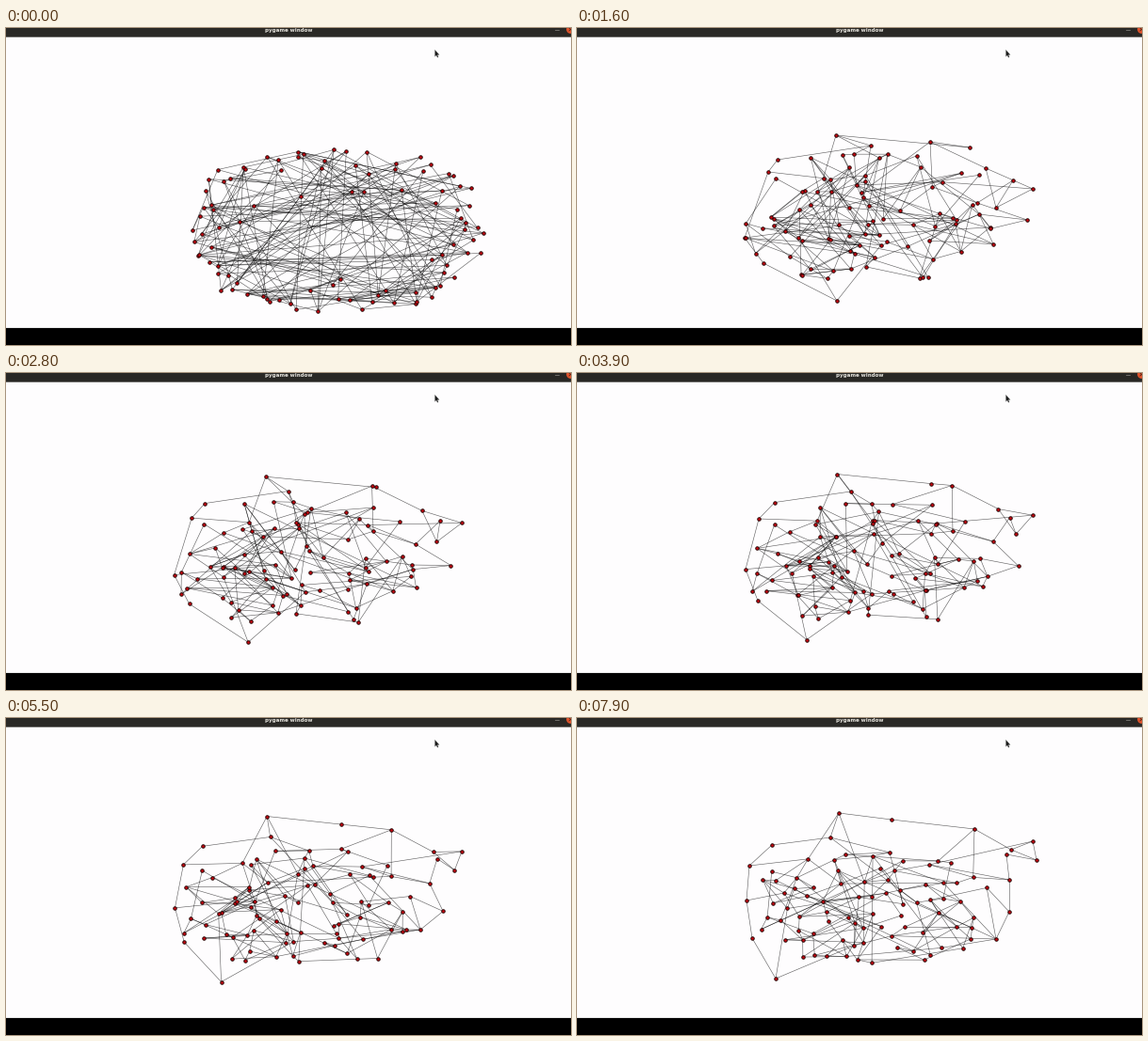
Animation, 600 px wide and 337 px high, one loop 8 s. Source, as a matplotlib script:

```python
import numpy as np
import matplotlib.pyplot as plt
from matplotlib.animation import FuncAnimation
from matplotlib.collections import LineCollection
from matplotlib.patches import Circle, Polygon, Rectangle

W, H, DPI = 600, 337, 100
FRAMES, INTERVAL = 80, 100
PX = 72 / DPI  # points per pixel
INNER = 79
MAX_DEGREE = 6
rng = np.random.default_rng(7)

# Key points of the outline, in order: resting place and drift towards it.
OUTLINE = np.array([
    (278, 101, 3, -13), (334, 108, -83, -19), (422, 118, 47, -3),
    (461, 140, 27, -9), (484, 131, 0, -40), (488, 151, 43, -40),
    (456, 145, -7, -17), (459, 172, 34, -14), (459, 206, -19, 2),
    (445, 235, 18, 37), (211, 277, -65, -13), (186, 234, -12, -16),
    (180, 194, 2, -29), (183, 157, -20, 4), (207, 135, -6, -5),
    (269, 127, -43, 2),
], float)
outer_end, drift = OUTLINE[:, :2], OUTLINE[:, 2:]
N_OUTER = len(OUTLINE)

CENTER = np.array([312.0, 201.0])
RADII = np.array([126.0, 62.0])


def rounded(ang, power):
    """Unit superellipse points at the given angles."""
    c, s = np.cos(ang), np.sin(ang)
    rad = (abs(c) ** power + abs(s) ** power) ** (-1 / power)
    return np.c_[c * rad, s * rad]


def spread_points(count):
    """Fill the central area with fairly even spacing."""
    pts = outer_end.copy()
    for _ in range(count):
        rad = np.sqrt(rng.uniform(0, 1, (5, 1)))
        cand = CENTER + RADII * rad * rounded(rng.uniform(0, 2 * np.pi, 5), 2.6)
        gap = np.linalg.norm(cand[:, None] - pts, axis=2).min(axis=1)
        pts = np.vstack([pts, cand[gap.argmax()]])
    return pts[N_OUTER:]


def ring_points(count):
    """Noisy rounded ring on which the layout starts."""
    ang = (np.arange(count) + rng.uniform(-0.8, 0.8, count)) * 2 * np.pi / count
    u, v = rng.uniform(0, 1, (2, count, 1))
    rad = 1.02 - 0.13 * u - 0.55 * v ** 5
    return rng.permutation((352, 214) + rad * rounded(ang, 2.7) * (152, 87))


def make_links(pos):
    """Chain the outline, then join nodes that end up near each other."""
    links = set()
    degree = np.zeros(len(pos), int)

    def join(i, j):
        pair = (min(i, j), max(i, j))
        if pair not in links:
            links.add(pair)
            degree[[i, j]] += 1

    for i in range(N_OUTER):
        j = (i + 1) % N_OUTER
        if np.linalg.norm(pos[i] - pos[j]) < 95:
            join(i, j)
    for i, p in enumerate(pos):
        weight = np.exp(-np.linalg.norm((pos - p) * (1, 1.3), axis=1) / 30)
        weight[i] = 0
        weight[degree >= MAX_DEGREE] = 0
        count = 1 if i < N_OUTER else 2
        for j in rng.choice(len(pos), count, replace=False, p=weight / weight.sum()):
            join(i, int(j))
    return np.array(sorted(links))


inner_end = spread_points(INNER)
loose = inner_end + rng.normal(0, 1, (INNER, 2)) * (38, 25)
reach = (abs((loose - CENTER) / (RADII * 1.08)) ** 2.6).sum(axis=1) ** (1 / 2.6)
loose = CENTER + (loose - CENTER) / np.maximum(1, reach)[:, None]
offset = loose - inner_end
bend = rng.normal(0, 0.2, (INNER, 2)) * offset[:, ::-1]

start = ring_points(N_OUTER + INNER)
links = make_links(np.vstack([outer_end, inner_end]))

HELD = {1, 2, 5, 8, 18, 19, 24, 29, 30, 40, 41, 56}


def layout(tick):
    """Fast collapse of the ring, then a drift that slows with log time."""
    step = sum(k not in HELD for k in range(1, tick + 1))
    p = np.log((step + 6) / 18) / np.log(73 / 18)
    if p < 0:
        p *= 0.35
    outer = outer_end - drift * (1 - p)
    inner = inner_end + offset * (1 - p) + bend * 4 * p * (1 - p)
    settled = np.vstack([outer, inner])
    return settled + (start - settled) * 0.35 ** step


fig = plt.figure(figsize=(W / DPI, H / DPI), dpi=DPI, facecolor="#fefdfe")
ax = fig.add_axes([0, 0, 1, 1])
ax.set_xlim(0, W)
ax.set_ylim(H, 0)
ax.axis("off")


def bar(y, height, color):
    ax.add_patch(Rectangle((0, y), W, height, fc=color, lw=0, aa=False))


# Window frame
bar(0, 9, "#292825")
bar(9, 1, "#6c6b69")
bar(318, 1, "#e6e6e6")
bar(319, 18, "black")
ax.text(300, 3.8, "pygame window", color="#e4e2dc", fontsize=5.5 * PX,
        family="DejaVu Sans", weight="bold", ha="center", va="baseline")
ax.plot([583, 587], [2.2, 2.2], color="#8c8a85", lw=0.7 * PX)
ax.add_patch(Circle((599.5, 1.5), 4.4, fc="#e2542c", lw=0))
for dy in (-1.6, 1.6):
    ax.plot([597.9, 601.1], [1.5 - dy, 1.5 + dy], color="#5a2414", lw=0.8 * PX)

edges = LineCollection([], colors="black", linewidths=0.6 * PX, alpha=0.62, zorder=3)
ax.add_collection(edges)
nodes = ax.scatter(start[:, 0], start[:, 1], s=(3.5 * PX) ** 2, c="#d00a12",
                   edgecolors="#1c0000", linewidths=0.9 * PX, zorder=4)

# Mouse pointer
arrow = np.array([(0, 0), (0, 7), (1.5, 5.6), (2.6, 8), (3.6, 7.5),
                  (2.6, 5.2), (4.6, 5.2)])
ax.add_patch(Polygon(arrow + (455.5, 23.3), fc="#1a1a1a", ec="#777777",
                     lw=0.3 * PX, zorder=5))


def update(tick):
    pos = layout(tick)
    nodes.set_offsets(pos)
    edges.set_segments(pos[links])
    return edges, nodes


anim = FuncAnimation(fig, update, frames=FRAMES, interval=INTERVAL,
                     repeat=True, repeat_delay=0, blit=False)
plt.show()
```
